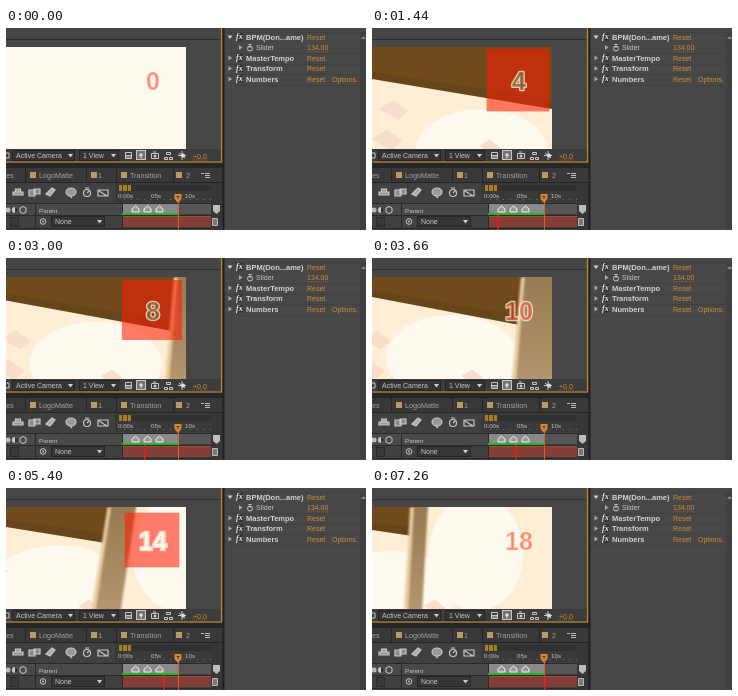
An HTML page with a canvas that plays this animation: 360x202 px, repeating every 7290 ms.

```html
<!DOCTYPE html>
<html lang="en">
<head>
<meta charset="utf-8">
<title>Beat counter preview</title>
<style>
html, body { margin: 0; width: 100%; height: 100%; overflow: hidden; background: #464646; }
svg, canvas { position: absolute; left: 0; top: 0; display: block; }
canvas { top: 19px; }
text { font: 7px "Liberation Sans", Arial, sans-serif; fill: #c4c4c4; }
.b { font-weight: bold; font-size: 7.5px; fill: #d2d2d2; }
.o { fill: #d18b32; }
.fx { font: italic bold 8px "Liberation Serif", serif; fill: #eee; }
.tab { font-size: 7.2px; fill: #a2a2a2; }
.small { font-size: 6.2px; }
.line { fill: none; stroke: #c8c8c8; }
#head { animation: run 7290ms linear infinite; }
@keyframes run {
  0% { transform: translateX(0); opacity: 0; }
  0.4% { transform: translateX(.23px); opacity: 1; }
  100% { transform: translateX(58px); opacity: 1; }
}
</style>
</head>
<body>
<svg width="360" height="202" viewBox="0 0 360 202">
  <defs>
    <path id="down" d="M0 0h5l-2.5 3.5z" fill="#d0d0d0"/>
    <path id="right" d="M0 0v5l3.5-2.5z" fill="#aaa"/>
    <path id="mark" d="M-3.5 3v-3l3.5-3 3.5 3v3z" fill="#999" stroke="#eee"/>
    <g id="fx"><rect width="7" height="7.5" fill="#333"/><text class="fx" x="0" y="6.3">fx</text></g>
    <rect id="comp" width="6" height="6" fill="#b99a65"/>
  </defs>

  <!-- viewer -->
  <rect width="217" height="135" fill="#464646"/>
  <path d="M0 11.5H215" stroke="#2e2e2e"/>
  <rect y="121" width="215" height="12" fill="#3c3c3c"/>
  <g stroke="#252525" fill="#343434">
    <rect x="6.5" y="122.5" width="62" height="10"/>
    <rect x="73.5" y="122.5" width="39" height="10"/>
  </g>
  <use href="#down" x="62" y="126"/><use href="#down" x="105" y="126"/>
  <text x="10" y="130">Active Camera</text>
  <text x="77" y="130">1 View</text>
  <path d="M0 125h3v5h-3" class="line"/>
  <g class="line">
    <path d="M119.5 124.5h6v6h-6zM119.5 127.500h6M119.5 129h6"/>
    <rect x="130.5" y="122.5" width="9" height="9" fill="#737373"/>
    <path d="M145.5 125.5h7v5h-7zM147 124h3M160.5 124.5h4v2h-4zM158.500 129.500h3v2h-3zM163.500 129.500h3v2h-3z"/>
    <path d="M133 127h4M135 125v5" stroke="#fff"/>
  </g>
  <circle cx="149" cy="128" r="1.5" fill="#ccc"/>
  <path d="M176 123v9M172 127.5h8M173 125l6 5" class="line"/>
  <circle cx="177" cy="127.5" r="2" fill="#ddd"/>
  <text class="o" x="187" y="130.5">+0.0</text>
  <path d="M186 132h15" stroke="#a87431" stroke-width=".7" stroke-dasharray="1 1"/>

  <!-- timeline -->
  <rect y="135" width="218" height="67" fill="#404040"/>
  <rect y="135" width="218" height="5" fill="#262626"/>
  <rect y="140" width="218" height="14" fill="#383838"/>
  <path d="M0 154.5H217M19.5 140v14M80.5 140v14M110.5 140v14M167.5 140v14" stroke="#242424"/>
  <text class="tab" x="0" y="150">es</text>
  <use href="#comp" x="24" y="144"/><text class="tab" x="33" y="150">LogoMatte</text>
  <use href="#comp" x="85" y="144"/><text class="tab" x="92" y="150">1</text>
  <use href="#comp" x="115" y="144"/><text class="tab" x="124" y="150">Transition</text>
  <use href="#comp" x="170" y="144"/><text class="tab" x="180" y="150">2</text>
  <path d="M195 145.5h3M199 145.5h5M199 147.5h5M199 149.5h5" stroke="#bbb"/>
  <g class="line" stroke-width="1.2">
    <path d="M7 164h10v3H7zM9.500 161h5v3h-5z" fill="#999"/>
    <path d="M23 162h6v6h-6zM28 161h6v5h-6z" fill="#888"/>
    <path d="M40 166l6-6 3 2-5 6z" fill="#aaa"/>
    <ellipse cx="65" cy="164" rx="5" ry="4" fill="#999"/>
    <path d="M64 168l2 2"/>
    <circle cx="81" cy="165" r="3.5"/><path d="M79 160h4M81 165l2-2"/>
    <path d="M92 162h10v6H92zM93 163l8 5"/>
  </g>
  <rect x="109" y="155" width="97" height="19" fill="#393939"/>
  <rect x="113" y="157" width="92" height="6" fill="#303030"/>
  <path d="M113 157h12v6h-12z" fill="#a77c20"/>
  <path d="M116.5 157v6M121.5 157v6" stroke="#493814"/>
  <text class="small" x="112" y="170">0:00s</text>
  <text class="small" x="145" y="170">05s</text>
  <text class="small" x="179" y="170">10s</text>
  <path d="M118 171.5H205" stroke="#777" stroke-dasharray="1 5.6"/>
  <rect y="176" width="116" height="12" fill="#494949"/>
  <rect x="116" y="175" width="56" height="11" fill="#8a8a8a"/>
  <rect x="172" y="175" width="33" height="11" fill="#555"/>
  <use href="#mark" x="129.5" y="181"/><use href="#mark" x="141.5" y="181"/><use href="#mark" x="153.5" y="181"/>
  <path d="M0 175.5H205M0 187.5H205M0 200.5H205M116.5 175v27M29.5 176v25" stroke="#292929"/>
  <rect x="116" y="185" width="56" height="2" fill="#1fb81f"/>
  <circle cx="9" cy="182" r="3" fill="#ccc"/><path d="M9 179a3 3 0 010 6z" fill="#333"/>
  <path d="M14 180l3-1.5 3 1.5v4l-3 1.5-3-1.5z" class="line"/><circle cx="2" cy="182" r="2.5" fill="#bbb"/>
  <text x="33" y="184.5" class="small">Parent</text>
  <rect x="4.5" y="189.5" width="8" height="9" fill="#383838" stroke="#292929"/>
  <circle cx="37" cy="193.5" r="2.8" class="line"/><circle cx="37" cy="193.5" r="1" fill="#bbb"/>
  <rect x="45.5" y="188.5" width="53" height="10" fill="#353535" stroke="#252525"/>
  <text x="49" y="196">None</text><use href="#down" x="91" y="192"/>
  <rect x="117" y="188" width="88" height="11" fill="#863d37"/>
  <path d="M117 188.5h88" stroke="#98504a"/>
  <rect x="205" y="155" width="12" height="47" fill="#363636"/>
  <path d="M207 177h7v6l-3.500 3-3.500-3z" fill="#bbb"/>
  <path d="M206.500 190.500h5v7h-5z" fill="#777" stroke="#bbb"/>
  <path d="M168.5 166h7v5l-3.5 4-3.5-4z" fill="#d98531"/>
  <path d="M170.5 168.5h3M172 168v3" stroke="#5c3718"/>
  <path d="M172.5 174v28" stroke="#d8602a"/>
  <path id="head" d="M114.7 187v15" stroke="#f01c14" stroke-width="1.4"/>
  <path d="M217.5 0v202" stroke="#202020" stroke-width="2"/>
  <path d="M0 134H215.5V0" fill="none" stroke="#c58222" stroke-width="1.2"/>

  <!-- effect controls -->
  <rect x="219" width="141" height="202" fill="#474747"/>
  <path d="M219 4.5h141M219 25.5h141M219 36.5h141M219 46.5h141M219 57.5h141" stroke="#414141"/>
  <rect x="354" y="4" width="6" height="198" fill="#404040"/>
  <path d="M355 11l2.500-3 2.500 3z" fill="#888"/>
  <use href="#down" x="221.5" y="7.5"/>
  <use href="#right" x="233" y="17"/><use href="#right" x="222.5" y="27.5"/>
  <use href="#right" x="222.5" y="38"/><use href="#right" x="222.5" y="48.5"/>
  <use href="#fx" x="230" y="5"/><use href="#fx" x="230" y="26"/>
  <use href="#fx" x="230" y="36.5"/><use href="#fx" x="230" y="47"/>
  <circle cx="244" cy="20.5" r="2.5" class="line"/><path d="M242.5 16.5h3M244 20v-2" stroke="#ccc"/>
  <text class="b" x="240" y="11.5">BPM(Don...ame)</text>
  <text x="250" y="22.3">Slider</text><text class="o" x="301" y="22.3">134.00</text>
  <path d="M301 23.8h21" stroke="#a87431" stroke-width=".7" stroke-dasharray="1 1"/>
  <text class="b" x="240" y="32.5">MasterTempo</text>
  <text class="b" x="240" y="43">Transform</text>
  <text class="b" x="240" y="53.5">Numbers</text>
  <text class="o" x="301" y="11.5">Reset</text><text class="o" x="301" y="32.5">Reset</text>
  <text class="o" x="301" y="43">Reset</text><text class="o" x="301" y="53.5">Reset</text>
  <text class="o" x="326" y="53.5">Options.</text>
</svg>
<canvas id="view" width="180" height="102"></canvas>

<script>
const LOOP = 7290, BEAT = 403, LEAD = 387;
const W = 180, H = 102, CX = 146, CY = 33;
const ctx = document.getElementById("view").getContext("2d");
const layer = Object.assign(document.createElement("canvas"), { width: W, height: H });
const ink = layer.getContext("2d");

const clamp = v => Math.max(0, Math.min(1, v));
const smooth = u => u * u * u * (u * (6 * u - 15) + 10);

// Piecewise linear value through [time, value] pairs
function along(t, keys) {
  let i = 1;
  while (i < keys.length - 1 && t > keys[i][0]) i++;
  const [a, x] = keys[i - 1], [b, y] = keys[i];
  return x + (y - x) * clamp((t - a) / (b - a));
}

const EDGE = [[1440, 32], [2310, 27], [3660, 20], [5400, 20], [7260, 23]];
const SLOPE = [[1440, .167], [3660, .19], [5400, .16], [7260, .15]];
const WIDTH = [[3660, 42], [5400, 25], [6510, 20], [7260, 14]];
const LEAN = [[3660, -9], [5400, -16], [6510, -8], [7260, -6]];

function poly(color, ...pts) {
  ctx.fillStyle = color;
  ctx.beginPath();
  for (let i = 0; i < pts.length; i += 2) ctx.lineTo(pts[i], pts[i + 1]);
  ctx.fill();
}

function oval(color, x, y, rx, ry) {
  ctx.fillStyle = color;
  ctx.beginPath();
  ctx.ellipse(x, y, rx, ry, 0, 0, 7);
  ctx.fill();
}

function drawScene(t) {
  const show = smooth(clamp((t - 30) / 900));
  const d = t - 3660;
  const x = 174 - .0298 * d - 1.36e-6 * d * d;
  const far = x - 174;
  const w = along(t, WIDTH), lean = along(t, LEAN);
  const edge = along(t, EDGE), k = along(t, SLOPE);
  const y = edge - (1 - show) * 75;

  poly("#fffaf0", 0, 0, W, 0, W, H, 0, H);
  ctx.globalAlpha = show;
  poly("#ffeed5", 0, 0, W, 0, W, H, 0, H);
  oval("#fffaf0", 80 + far * .5, 40 + edge * 2, 66, 42);
  oval("#fffaf0", x + 55, 46, 47, 58);
  for (const [px, py, s] of [[4, 62, 15], [-3, 92, 16], [100, 99, 11]])
    poly("#f8dfcb", px + far * .3 - s, py, px + far * .3, py - s * .6,
      px + far * .3 + s, py + 2, px + far * .3 + s * .3, py + s * .7);

  // Brown wall and the beam crossing it
  ctx.globalAlpha = 1;
  const right = Math.min(W, x);
  poly("#66451a", 0, -1, right, -1, right, y + k * right, 0, y);
  poly("#6f4a1a", 0, -1, right, -1, right, y + k * right - 10, 0, y - 7);
  ctx.globalAlpha = clamp((t - 1500) / 600);
  poly("#7c6448", x - 212, 0, x - 194, 0, x - 195, y + 3, x - 212, y);

  // Post with soft sides
  ctx.globalAlpha = show;
  ctx.filter = "blur(1px)";
  const l = x - w / 2, r = x + w / 2;
  poly("#e8cda3", l - 4, 0, l + 4, 0, l + 4 + lean, H, l - 4 + lean, H);
  const tan = ctx.createLinearGradient(0, 0, 0, H);
  tan.addColorStop(0, "#977a51");
  tan.addColorStop(1, "#b4966e");
  poly(tan, l, -3, r, -3, r + lean, H + 3, l + lean, H + 3);
  ctx.filter = "none";
  ctx.globalAlpha = 1;
}

function stamp(alpha) {
  ctx.globalAlpha = alpha;
  ctx.drawImage(layer, 0, 0);
  ctx.globalAlpha = 1;
}

function resetInk() {
  ink.globalCompositeOperation = "source-over";
  ink.globalAlpha = 1;
  ink.clearRect(0, 0, W, H);
  ink.font = 'bold 25px "Liberation Sans", Arial, sans-serif';
  ink.textAlign = "center";
  ink.lineJoin = "round";
}

function drawBeat(t) {
  const beat = (t + LEAD) / BEAT, n = Math.floor(beat);
  const size = 63 * smooth(1 - Math.abs(2 * (beat - n) - 1));

  // The digits invert the pulsing square
  resetInk();
  ink.fillStyle = "#ff1e04";
  ink.fillRect(CX - size / 2, CY - size / 2, size, size);
  ink.globalCompositeOperation = "xor";
  ink.fillText(n, CX + 1, 43);
  stamp(.57);

  resetInk();
  ink.strokeStyle = "#fff6df";
  ink.lineWidth = 2.6;
  ink.strokeText(n, CX + 1, 43);
  ink.globalCompositeOperation = "destination-out";
  ink.globalAlpha = .65;
  ink.fillText(n, CX + 1, 43);
  stamp(.75);
}

const head = document.getElementById("head").getAnimations()[0];
const start = performance.now();
function frame() {
  const t = Math.max(0, performance.now() - start) % LOOP;
  if (head) head.currentTime = t;
  drawScene(t);
  drawBeat(t);
  requestAnimationFrame(frame);
}
frame();
</script>
</body>
</html>
```
